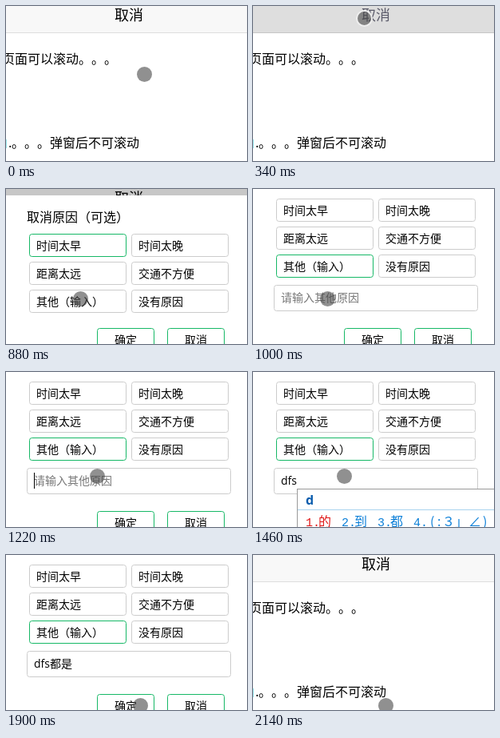
An HTML page with a canvas for the animation above (2380 ms loop, 302 px wide and 194 px high).

```html
<!DOCTYPE html>
<html lang="zh">
<head>
<meta charset="utf-8">
<style>
html, body { margin: 0; width: 100%; height: 100%; overflow: hidden; background: #fff; }
canvas { display: block; }
</style>
</head>
<body>
<canvas id="stage" width="302" height="194"></canvas>
<script>
const ctx = document.getElementById('stage').getContext('2d');
const LOOP = 2380;
const GREEN = '#16b866', GRAY = '#ccc', BLUE = '#0b7fd8';
const OPTIONS = ['时间太早', '时间太晚', '距离太远', '交通不方便', '其他（输入）', '没有原因'];

// Each step: start time, cursor position, and the state it changes.
const steps = [
  { t: 0, at: [173, 85], sheet: null, dim: 0, press: false, pick: 0, text: '', caret: false, ime: null },
  { t: 100, at: [152, 42] },
  { t: 220, at: [139, 15] },
  { t: 340, press: true, dim: 0.105 },
  { t: 440, press: false, dim: 0.2, sheet: 75 },
  { t: 540, sheet: 8 },
  { t: 660, at: [126, 58] },
  { t: 760, at: [105, 108] },
  { t: 880, at: [93, 137] },
  { t: 1000, pick: 4, sheet: -36 },
  { t: 1100, at: [114, 130] },
  { t: 1220, caret: true },
  { t: 1340, text: 'dfs' },
  { t: 1460, caret: false, ime: ['d', '的', '到', '都'] },
  { t: 1580, ime: ['ds', '都是', '但是', '大师'] },
  { t: 1680, text: 'dfs都是', caret: true, ime: null },
  { t: 1800, at: [140, 160], caret: false },
  { t: 1900, at: [168, 188] },
  { t: 2140, at: [166, 188], sheet: null, dim: 0 }
];

function rect(x, y, w, h, color) {
  ctx.fillStyle = color;
  ctx.fillRect(x, y, w, h);
}

// Draws one character at a time so that full-width punctuation keeps its width.
// Returns the x position after the last character.
function text(str, x, y, size, color = '#000', family = '"Noto Sans CJK SC"', weight = '') {
  ctx.font = `${weight} ${size}px ${family}, "Noto Sans CJK SC", "Noto Sans CJK", sans-serif`;
  ctx.fillStyle = color;
  for (const c of str) {
    ctx.fillText(c, x, y);
    x += ctx.measureText(c).width;
  }
  return x;
}

function frame(x, y, w, h, color) {
  ctx.beginPath();
  ctx.roundRect(x + 0.5, y + 0.5, w - 1, h - 1, 3);
  ctx.strokeStyle = color;
  ctx.lineWidth = 1;
  ctx.stroke();
}

function drawPage(s) {
  rect(0, 0, 302, 194, '#fff');
  rect(0, 0, 302, 33, '#f8f8f8');
  rect(0, 33, 302, 1, '#ddd');
  text('取消', 136, 18, 18, s.press ? '#667' : '#000');
  rect(0, 0, 302, 34, `rgba(0,0,0,${s.dim})`);
  text('页面可以滚动。。。', -5, 72, 16);
  rect(0, 167, 1, 11, '#9be8ee');
  text('.', 3, 177, 16);
  text('。。。弹窗后不可滚动', 7, 177, 16);
}

function drawInput(s) {
  frame(26, 120, 256, 33, GRAY);
  const end = s.text
    ? text(s.text, 35, 141, 14, '#000', '"Open Sans"')
    : text('请输入其他原因', 35, 141, 14, '#777');
  if (s.caret) rect(s.text ? Math.ceil(end) : 35, 126, 1, 20, '#000');
}

function drawSheet(s) {
  const top = s.sheet;
  const slide = Math.max(0, top - 8);
  rect(0, top, 302, 194 - top, '#fff');
  text('取消原因（可选）', 26, top + 33, 16);
  OPTIONS.forEach((label, i) => {
    const x = 29 + i % 2 * 128, y = top + 48 + (i >> 1) * 35;
    frame(x, y, 122, 29, i === s.pick ? GREEN : GRAY);
    text(label, x + 9, y + 20, 14);
  });
  if (s.pick === 4) drawInput(s);
  ['确定', '取消'].forEach((label, i) => {
    const x = 114 + i * 88;
    frame(x, 174 + slide, 72, 30, GREEN);
    text(label, x + 22, 194 + slide, 14);
  });
}

function drawIme([typed, ...words]) {
  rect(55, 146, 247, 48, '#fff');
  rect(55, 146, 247, 1, '#999');
  rect(55, 146, 1, 48, '#999');
  rect(56, 172, 246, 1, '#a9d3ee');
  text(typed, 66, 166, 16, '#0a5cad', '"Open Sans"', 'bold');
  const gap = words[0].length > 1 ? 64 : 45;
  words.forEach((word, i) => {
    const x = 66 + i * gap, color = i ? BLUE : '#e01818';
    text(i + 1 + '.', x, 193, 15, color, '"Liberation Mono"');
    text(word, x + 16, 193, 16, color);
  });
  if (typed === 'd') {
    text('4.', 201, 193, 15, BLUE, '"Liberation Mono"');
    [['(', 222], [':', 231], ['３', 237], ['」', 253], ['∠', 270], [')', 288]]
      .forEach(([c, x]) => text(c, x, 193, 16, BLUE));
  }
}

function drawCursor({ at: [x, y], press }) {
  ctx.beginPath();
  ctx.arc(x + 0.5, y + 0.5, 9.5, 0, Math.PI * 2);
  ctx.fillStyle = 'rgba(70,70,70,.6)';
  ctx.fill();
  if (press) {
    ctx.strokeStyle = '#eee';
    ctx.lineWidth = 2;
    ctx.stroke();
  }
}

function draw(now) {
  const time = now % LOOP;
  const s = Object.assign({}, ...steps.filter(step => step.t <= time));
  drawPage(s);
  if (s.sheet !== null) drawSheet(s);
  if (s.ime) drawIme(s.ime);
  drawCursor(s);
}

const start = performance.now();
function tick() {
  draw(performance.now() - start);
  requestAnimationFrame(tick);
}
tick();
</script>
</body>
</html>
```
